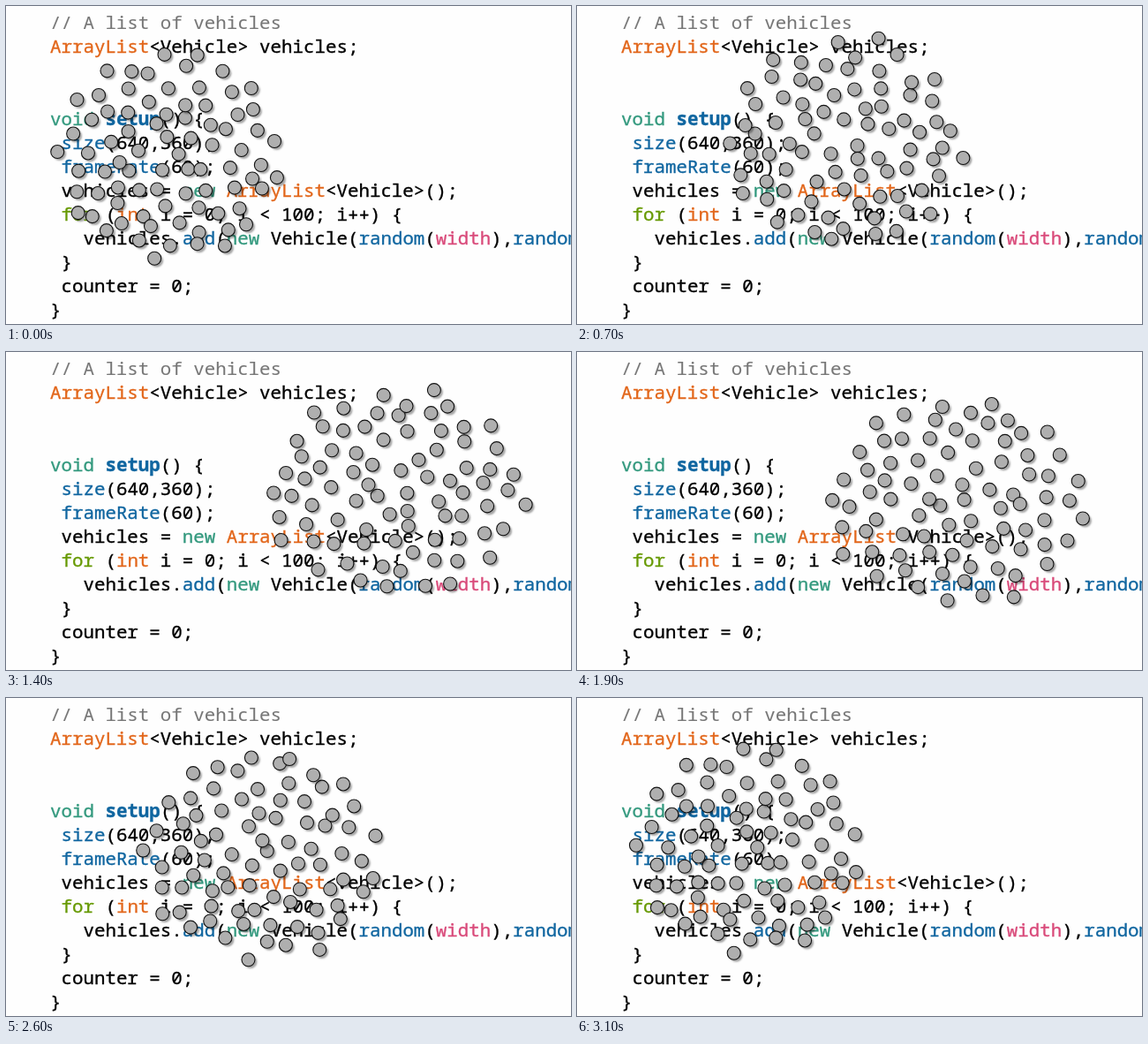
These frames come from a looping animation (640 px wide and 360 px high, 3.2 s). An HTML page with a canvas:

```html
<!DOCTYPE html>
<html lang="en">
<head>
<meta charset="utf-8">
<title>Flocking vehicles</title>
<style>
  html, body { margin: 0; width: 100%; height: 100%; overflow: hidden; background: #fefefe; }
  svg, canvas { position: absolute; left: 0; top: 0; width: 640px; height: 360px; }
  text {
    font: 500 20.8px "Noto Sans Mono", "DejaVu Sans Mono", monospace;
    color: #000; white-space: pre;
  }
  text, tspan { fill: currentColor; stroke: currentColor; stroke-width: 0.35; }
  .comment { color: #777; stroke-width: 0.1; }
  .type { color: #e2661a; }
  .word { color: #33997e; }
  .call { color: #1066a0; }
  .loop { color: #669900; }
  .var { color: #d94a7a; }
  .bold { font-weight: 700; }
</style>
</head>
<body>
<svg viewBox="0 0 640 360">
  <text x="50" y="26" class="comment">// A list of vehicles</text>
  <text x="50" y="53"><tspan class="type">ArrayList</tspan>&lt;Vehicle&gt; vehicles;</text>
  <text x="50" y="134.5"><tspan class="word">void</tspan> <tspan class="call bold">setup</tspan>() {</text>
  <text x="62.5" y="161.5"><tspan class="call">size</tspan>(640,360);</text>
  <text x="62.5" y="188.5"><tspan class="call">frameRate</tspan>(60);</text>
  <text x="62.5" y="215.5">vehicles = <tspan class="word">new</tspan> <tspan class="type">ArrayList</tspan>&lt;Vehicle&gt;();</text>
  <text x="62.5" y="242.5"><tspan class="loop">for</tspan> (<tspan class="type">int</tspan> i = 0; i &lt; 100; i++) {</text>
  <text x="87.5" y="269.5">vehicles.<tspan class="call">add</tspan>(<tspan class="word">new</tspan> Vehicle(<tspan class="call">random</tspan>(<tspan class="var">width</tspan>),<tspan class="call">random</tspan>(<tspan class="var">height</tspan>)));</text>
  <text x="62.5" y="296.5">}</text>
  <text x="62.5" y="323.5">counter = 0;</text>
  <text x="50" y="350.5">}</text>
</svg>
<canvas id="stage" width="640" height="360"></canvas>
<script>
const LOOP = 3200, STEP = 100, COUNT = 80, RADIUS = 7.5;
const TURN = 2 * Math.PI;
const GOLDEN = Math.PI * (3 - Math.sqrt(5));
const ctx = document.getElementById('stage').getContext('2d');

let seed = 7;
function random() {
  seed = (seed * 16807) % 2147483647;
  return seed / 2147483647;
}

// Evenly spaced in a unit disc, each with its own phase for jostling.
const vehicles = Array.from({ length: COUNT }, (_, i) => {
  const r = Math.sqrt((i + 0.5) / COUNT);
  return {
    u: r * Math.cos(i * GOLDEN),
    v: r * Math.sin(i * GOLDEN),
    px: random() * TURN,
    py: random() * TURN
  };
});

// Sine of the loop, zero and rising at the given time.
const wave = (t, zero) => Math.sin(TURN * (t - zero) / LOOP);

// Steady speed between two soft turns, from -1 to 1.
function sweep(t) {
  const k = 0.97;
  return Math.asin(k * wave(t, 820)) / Math.asin(k);
}

function flock(t) {
  return {
    x: 326 + 141 * sweep(t),
    y: 165 - 13 * wave(t, 200),
    w: 140 + 10 * wave(t, 800),
    h: 118
  };
}

const jostle = (t, phase) => 5 * Math.sin(TURN * t / LOOP + phase);

function drawVehicle(x, y) {
  ctx.beginPath();
  ctx.arc(x, y, RADIUS, 0, TURN);
  ctx.shadowColor = 'rgba(0, 0, 0, 0.35)';
  ctx.fill();
  ctx.shadowColor = 'transparent';
  ctx.stroke();
}

function draw(t) {
  const { x, y, w, h } = flock(t);
  ctx.clearRect(0, 0, 640, 360);
  ctx.fillStyle = '#afafaf';
  ctx.strokeStyle = '#111';
  ctx.lineWidth = 1.1;
  ctx.shadowBlur = 2;
  ctx.shadowOffsetX = ctx.shadowOffsetY = 2.5;
  for (const { u, v, px, py } of vehicles) {
    drawVehicle(x + u * w + jostle(t, px), y + v * h + jostle(t, py));
  }
}

const start = performance.now();
function tick() {
  const t = (performance.now() - start) % LOOP;
  draw(Math.floor(t / STEP) * STEP);
  requestAnimationFrame(tick);
}
tick();
</script>
</body>
</html>
```
